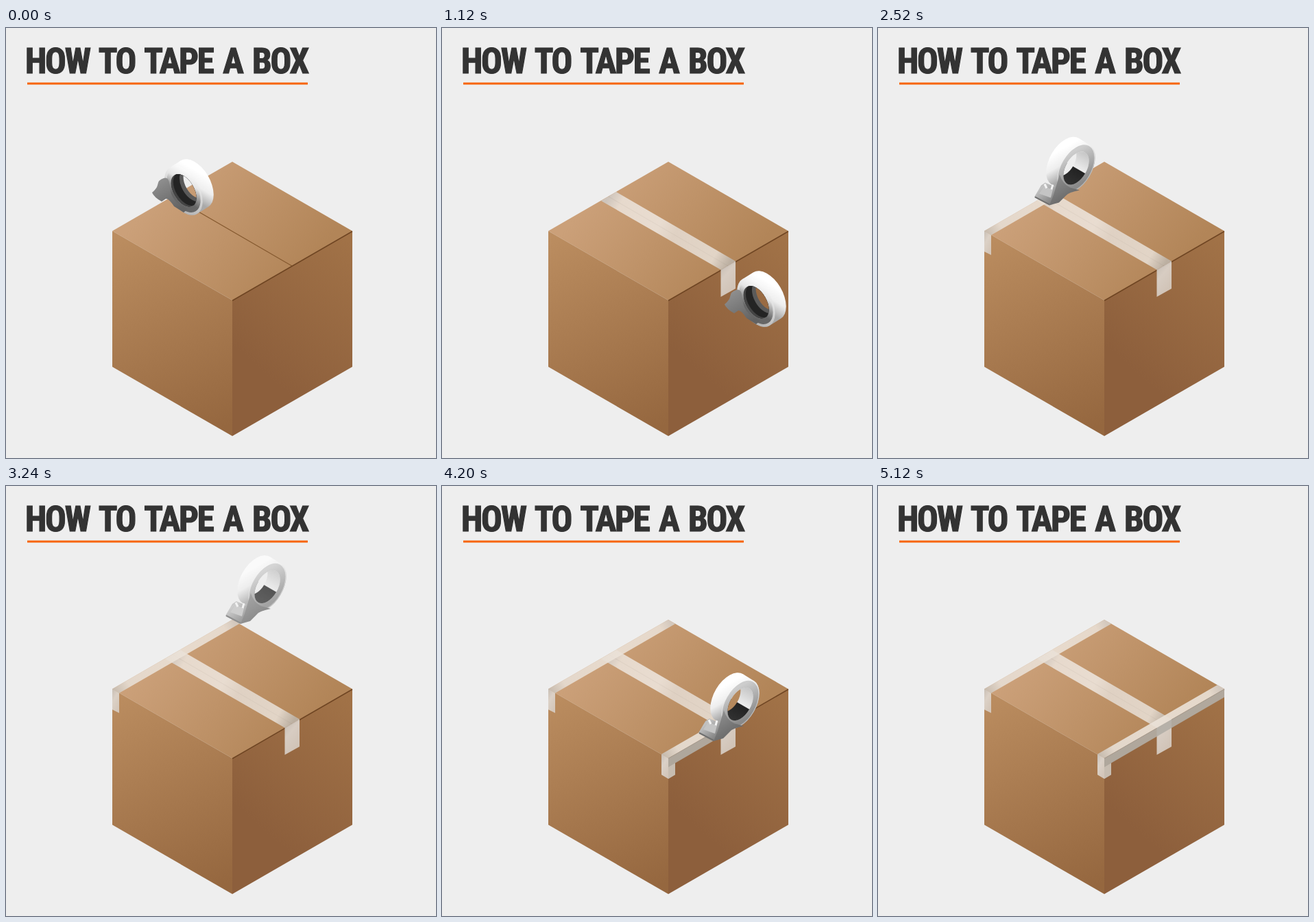
Animation of 627x627 px, one loop 5400 ms. Source, as an HTML page:

```html
<!DOCTYPE html>
<html lang="en">
<head>
<meta charset="utf-8">
<title>How to tape a box</title>
<style>
  html, body { margin: 0; width: 100%; height: 100%; overflow: hidden; background: #eee; }
  svg { display: block; width: 100%; height: 100%; }
  .title {
    font: 700 51px "Roboto Condensed", "Open Sans Condensed", "Liberation Sans Narrow", Roboto, "Open Sans", sans-serif;
    font-stretch: 75%;
    letter-spacing: -2.2px;
    word-spacing: 5px;
    fill: #333;
    stroke: #333;
    stroke-width: 1.2px;
  }
</style>
</head>
<body>
<svg viewBox="0 0 627 627">
  <defs>
    <g id="gradients">
      <linearGradient id="boxTop" gradientUnits="userSpaceOnUse" x1="240" y1="220" x2="420" y2="370">
        <stop stop-color="#cba079"/><stop offset="1" stop-color="#b28558"/>
      </linearGradient>
      <linearGradient id="boxLeft" gradientUnits="userSpaceOnUse" x1="170" y1="300" x2="300" y2="590">
        <stop stop-color="#bb8d60"/><stop offset="1" stop-color="#95673f"/>
      </linearGradient>
      <linearGradient id="boxRight" gradientUnits="userSpaceOnUse" x1="350" y1="480" x2="500" y2="310">
        <stop stop-color="#8d5f3c"/><stop offset="1" stop-color="#a17247"/>
      </linearGradient>

      <linearGradient id="tapeMiddle" gradientUnits="userSpaceOnUse" x1="243" y1="246" x2="417" y2="347">
        <stop stop-color="#cfcac5"/><stop offset=".1" stop-color="#ebe2d9"/>
        <stop offset=".42" stop-color="#eee6de"/><stop offset=".55" stop-color="#e4dad0"/>
        <stop offset=".88" stop-color="#e8dfd5"/><stop offset="1" stop-color="#bdb5ab"/>
      </linearGradient>
      <linearGradient id="tapeEdge" gradientUnits="userSpaceOnUse" x1="0" y1="0" x2="175" y2="-101">
        <stop stop-color="#c6beb4"/><stop offset=".12" stop-color="#e7dfd6"/>
        <stop offset=".5" stop-color="#ece3d9"/><stop offset=".92" stop-color="#eae1d7"/>
        <stop offset="1" stop-color="#d6cfc8"/>
      </linearGradient>
      <linearGradient id="tapeEnd" x2=".5" y2="1">
        <stop stop-color="#cac6c1"/><stop offset=".45" stop-color="#e0dad4"/><stop offset="1" stop-color="#d8cfc6"/>
      </linearGradient>

      <linearGradient id="rollSide" gradientUnits="userSpaceOnUse" x1="0" y1="-40" x2="0" y2="5">
        <stop stop-color="#fff"/><stop offset=".5" stop-color="#eee"/><stop offset="1" stop-color="#a9a9a9"/>
      </linearGradient>
      <linearGradient id="rollFace" gradientUnits="userSpaceOnUse" x1="0" y1="-32" x2="0" y2="32">
        <stop stop-color="#fbfbfb"/><stop offset=".5" stop-color="#d5d5d5"/><stop offset="1" stop-color="#b4b4b4"/>
      </linearGradient>
      <linearGradient id="darkBezel" gradientUnits="userSpaceOnUse" x1="0" y1="-14" x2="0" y2="14">
        <stop stop-color="#666" stop-opacity="0"/><stop offset="1" stop-color="#666"/>
      </linearGradient>
      <linearGradient id="silverBezel" gradientUnits="userSpaceOnUse" x1="0" y1="-26" x2="0" y2="26">
        <stop stop-color="#cdcdcd"/><stop offset="1" stop-color="#8a8a8a"/>
      </linearGradient>
      <!-- Light above and dark below, split along the axis of the roll. -->
      <linearGradient id="lightWall" gradientUnits="userSpaceOnUse" x1="-16" y1="-16" x2="16" y2="16">
        <stop stop-color="#c4c4c4"/><stop offset=".49" stop-color="#ececec"/>
        <stop offset=".51" stop-color="#222"/><stop offset="1" stop-color="#333"/>
      </linearGradient>
      <linearGradient id="holder" x2=".6" y2="1">
        <stop stop-color="#969696"/><stop offset="1" stop-color="#626262"/>
      </linearGradient>
      <linearGradient id="tip" x2=".7" y2="1">
        <stop stop-color="#808080"/><stop offset=".4" stop-color="#c2c2c2"/><stop offset="1" stop-color="#777"/>
      </linearGradient>
    </g>

    <clipPath id="reveal0"><rect/></clipPath>
    <clipPath id="reveal1"><rect/></clipPath>
    <clipPath id="reveal2"><rect/></clipPath>

    <!-- The roll is a short cylinder, drawn flat and tilted by an isometric matrix. -->
    <clipPath id="core"><circle r="21.5"/></clipPath>
    <mask id="opening" maskUnits="userSpaceOnUse" x="-60" y="-80" width="140" height="140">
      <path d="M-60-80h140v140h-140z" fill="#fff"/>
      <g clip-path="url(#core)"><circle cx="18.5" cy="-19.2" r="19"/></g>
    </mask>
    <g id="roll">
      <path d="M0 0 18.5-19.2" stroke="url(#rollSide)" stroke-width="64" stroke-linecap="round"/>
      <circle r="32" fill="url(#rollFace)"/>
    </g>

    <g id="gunRight">
      <g transform="matrix(.866 .5 0 1 46 46)" mask="url(#opening)">
        <use href="#roll"/>
        <circle r="25" fill="none" stroke="url(#darkBezel)" stroke-width="7"/>
        <circle r="21.5" fill="#444"/>
        <g clip-path="url(#core)">
          <circle cx="4" cy="-4" r="21.5" fill="#242424"/>
          <circle cx="14" cy="-14.5" r="21" fill="#5a5a5a"/>
        </g>
      </g>
      <path d="M0 49Q7 43 8 38 9 30 17 28 23 26 25 34L27 47Q30 60 40 66L52 73 46 78 32 69Q24 57 20 58L14 62Q3 56 0 49Z" fill="url(#holder)"/>
    </g>

    <g id="gunLeft">
      <g transform="matrix(-.866 .5 0 1 61 45)" mask="url(#opening)">
        <use href="#roll"/>
        <circle r="26" fill="none" stroke="url(#silverBezel)" stroke-width="9"/>
        <circle r="21.5" fill="url(#lightWall)"/>
      </g>
      <path d="M0 87 10 70 16 66 30 72 37 56 36 92 22 99Z" fill="url(#tip)"/>
      <path d="M7 82 14 72 27 76 24 88Z" fill="#c4c4c4"/>
      <path d="M15 68 18 74M27 69 25 76" stroke="#f4f4f4" stroke-width="3"/>
      <path d="M37 54Q41 68 52 73L66 77Q50 80 46 85L36 95 22 99 28 84Z" fill="url(#holder)"/>
      <path d="M1 87 22 98" stroke="#6f6f6f" stroke-width="2"/>
    </g>
  </defs>

  <text class="title" x="28" y="66">HOW TO TAPE A BOX</text>
  <path d="M31 81H440" stroke="#f76406" stroke-width="3"/>

  <path d="M155 296 330 195 505 296 330 397Z" fill="url(#boxTop)"/>
  <path d="M155 296 330 397V595L155 494Z" fill="url(#boxLeft)"/>
  <path d="M330 397 505 296V494L330 595Z" fill="url(#boxRight)"/>
  <path d="M243 246 417 347" stroke="#85592f" stroke-width="1.2"/>
  <path d="M330 397.5 505 296.5" stroke="#6f4522" stroke-width="1.6"/>

  <g clip-path="url(#reveal0)" fill-opacity=".88">
    <path d="M232 252 254 239 428 340 406.500 352.500Z" fill="url(#tapeMiddle)"/>
    <path d="M406.500 352.500 428 340V380L406.500 392Z" fill="url(#tapeEnd)"/>
  </g>
  <g clip-path="url(#reveal1)" fill-opacity=".88">
    <path transform="translate(155 296)" d="M0 0 175-101 185-95 10 6Z" fill="url(#tapeEdge)"/>
    <path d="M155 296 165 302V331L155 326Z" fill="url(#tapeEnd)"/>
  </g>
  <g clip-path="url(#reveal2)" fill-opacity=".9">
    <path transform="translate(320 391)" d="M0 0 10 6 185-95 175-101Z" fill="url(#tapeEdge)"/>
    <path d="M330 397 505 296V308L340 404V421L330 427Z" fill="#b3aea7"/>
    <path d="M330 410 340 404V421L330 427Z" fill="#d2c6ba" fill-opacity=".7"/>
    <path d="M320 391 330 397V427L320 421Z" fill="url(#tapeEnd)"/>
  </g>

  <use class="gun" href="#gunRight"/>
  <use class="gun" href="#gunLeft"/>
  <use class="gun" href="#gunLeft"/>
</svg>
<script>
  const LOOP = 5400, FRAME = 40;

  // path: [time, x, y]; fade: [time, opacity]
  const strokes = [
    {
      path: [[120, 213, 191], [880, 405, 302], [1120, 412, 354]],
      fade: [[1440, 1], [1600, 0]],
      reveal: (x, y) => [0, x + 17, y + 52],
    },
    {
      path: [[1960, 153, 239], [2240, 153, 204], [2360, 187, 185], [2880, 320, 102]],
      fade: [[1800, 0], [1960, 1], [3200, 1], [3360, 0]],
      reveal: (x, y) => [y + 77, x + 21, 627],
    },
    {
      path: [[3760, 319, 334], [4000, 319, 306], [4200, 374, 273], [4320, 411, 253], [4640, 494, 205]],
      fade: [[3639, 0], [3640, 1], [4960, 1], [5120, 0]],
      reveal: (x, y) => [y + 77, x + 21, 627],
    },
  ];
  const guns = document.querySelectorAll('.gun');
  const reveals = strokes.map((_, i) => document.querySelector(`#reveal${i} rect`));

  function sample(keys, time) {
    const next = keys.findIndex(key => key[0] > time);
    if (next === 0) return keys[0].slice(1);
    if (next < 0) return keys[keys.length - 1].slice(1);
    const from = keys[next - 1], to = keys[next];
    const part = (time - from[0]) / (to[0] - from[0]);
    return from.slice(1).map((value, i) => value + (to[i + 1] - value) * part);
  }

  function setAttributes(element, values) {
    for (const name in values) element.setAttribute(name, values[name]);
  }

  function draw(now) {
    const time = Math.floor((now % LOOP) / FRAME) * FRAME;
    strokes.forEach(({ path, fade, reveal }, i) => {
      const [x, y] = sample(path, time);
      const [opacity] = sample(fade, time);
      const [top, right, bottom] = reveal(x, y);
      setAttributes(guns[i], { transform: `translate(${x} ${y})`, opacity });
      setAttributes(reveals[i], { y: top, width: time > path[0][0] ? right : 0, height: bottom - top });
    });
  }

  let start;
  function tick(now) {
    start ??= now;
    draw(now - start);
    requestAnimationFrame(tick);
  }
  draw(0);
  requestAnimationFrame(tick);
</script>
</body>
</html>
```
